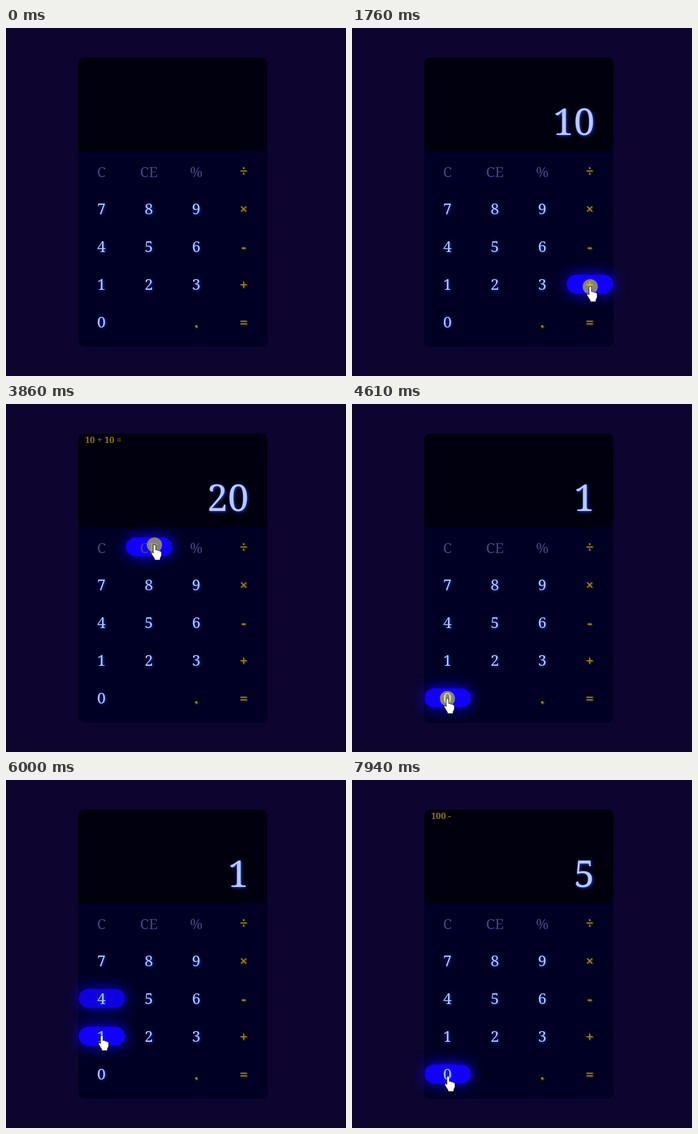
Write an HTML page that moves like this. It is 538 by 553 pixels and loops after 8000 ms.

```html
<!DOCTYPE html>
<html lang="pt">
<head>
<meta charset="utf-8">
<title>Calculadora</title>
<style>
  html, body { margin: 0; width: 100%; height: 100%; overflow: hidden; background: #0d0530; }
  svg { display: block; width: 538px; height: 553px; }
  text { font-family: "Noto Serif", serif; }
  .key { font-size: 24px; text-anchor: middle; }
  .digit, #display { fill: #bcc8ff; filter: drop-shadow(1px 1px 2px #1450e0); }
  .tool { font-size: 22.5px; fill: #4a4284; }
  .op { fill: #a08013; font-weight: 700; filter: drop-shadow(1px 1px 1px #6b5205); }
  .pill { fill: #1100ff; filter: drop-shadow(0 0 11px #1100ff); }
  #display { font-size: 59px; text-anchor: end; }
  #history { font-size: 14px; font-weight: 700; fill: #8f7412; }
  #menu text { font: 10.5px "Open Sans", sans-serif; fill: #fff; }
  #cursor path { fill: #fff; stroke: #000; stroke-width: .8; stroke-linejoin: round; }
</style>
</head>
<body>
<svg viewBox="0 0 538 553">
  <rect x="114" y="47" width="300" height="460" rx="10" fill="#000024"/>
  <rect x="114" y="47" width="300" height="150" rx="10" fill="#00000f"/>
  <text id="history" x="125" y="62"></text>
  <text id="display" x="384" y="170"></text>
  <g id="pills"></g>
  <g id="keys"></g>
  <g id="selection">
    <rect x="144" y="452" width="14" height="30" fill="#0860da"/>
    <text class="key" x="151" y="476" fill="#fff">0</text>
  </g>
  <g id="menu">
    <path d="M143 436H159L151 447Z" fill="#26222f"/>
    <rect x="87" y="406" width="127" height="31" rx="4" fill="#26222f"/>
    <path d="M157.5 414V430" stroke="#565161"/>
    <text x="99" y="425">Pesquisar</text>
    <text x="170" y="425">Copiar</text>
  </g>
  <circle id="press" r="12" fill="#ff0" fill-opacity=".5"/>
  <g id="cursor">
    <path id="arrow" d="M0 0V16L3.7 12.5 6.2 18.5 8.8 17.4 6.3 11.6H11.5Z"/>
    <path id="hand" d="M-2 1.5a2 2 0 0 1 4 0V8q2.5-1 3.5 1 2-1 3 1 2.500-1 2.500 2v5l-2 4v3H0v-2L-5 14q-1-3 2-3l1 2z"/>
  </g>
</svg>
<script>
const LOOP = 8000;
const $ = id => document.getElementById(id);

// Cursor stops: time, x, y
const path = [
  [70, 57, 493], [500, 145, 462], [760, 157, 406], [940, 157, 406],
  [1120, 152, 468], [1270, 152, 468], [1600, 377, 411], [1820, 377, 411],
  [2050, 155, 410], [2200, 155, 410], [2340, 152, 468], [2450, 152, 468],
  [2520, 215, 452], [2740, 376, 470], [2930, 376, 470], [3130, 428, 450],
  [3400, 330, 375], [3700, 235, 224], [3930, 235, 224], [4210, 152, 410],
  [4370, 152, 410], [4560, 151, 468], [5050, 151, 467], [5170, 146, 263],
  [5300, 143, 254], [5420, 150, 229], [5740, 150, 229], [6130, 152, 467],
  [6560, 152, 467], [6640, 255, 388], [6760, 313, 382], [6950, 377, 349],
  [7110, 377, 349], [7340, 227, 352], [7570, 227, 352], [7900, 152, 471],
  [8000, 152, 471]
];
const presses = [870, 1180, 1740, 2140, 2400, 2820, 3850, 4300, 4650, 4880, 5480, 5660, 6250, 6400, 7030, 7460];
const displaySteps = [
  [0, ""], [935, "1"], [1240, "10"], [2200, "1"], [2460, "10"], [2880, "20"],
  [3925, ""], [4360, "1"], [4710, "10"], [4940, "100"], [5540, "10"],
  [5720, "1"], [6310, "10"], [6460, "100"], [7530, "5"]
];
const historySteps = [[0, ""], [1790, "10 +"], [2880, "10 + 10 ="], [3925, ""], [7090, "100 -"]];
const selections = [[4950, 5450], [6460, 7000]];
const menus = [[5090, 5450], [6520, 7000]];

const rows = [["C", "CE", "%", "÷"], ["7", "8", "9", "×"], ["4", "5", "6", "-"],
              ["1", "2", "3", "+"], ["0", "", ".", "="]];

function add(parent, tag, attrs) {
  const el = document.createElementNS("http://www.w3.org/2000/svg", tag);
  for (const name in attrs) el.setAttribute(name, attrs[name]);
  return parent.appendChild(el);
}

const keys = rows.flatMap((row, r) => row.map((label, c) => {
  if (!label) return null;
  const x = 115 + 75 * c, y = 212 + 60 * r;
  const kind = /\d/.test(label) ? "digit" : /[CE%]/.test(label) ? "tool" : "op";
  const pill = add($("pills"), "rect", { class: "pill", x, y, width: 73, height: 30, rx: 15 });
  const text = add($("keys"), "text", { class: "key " + kind, x: x + 36, y: y + (kind == "tool" ? 25 : 24) });
  text.textContent = label;
  return { x, y, pill };
})).filter(Boolean);

const clamp = v => Math.max(0, Math.min(1, v));
const latest = (steps, t) => steps.findLast(s => s[0] <= t)[1];
const during = (spans, t) => spans.find(([from, to]) => t >= from && t < to);
const inside = (key, [x, y]) => x >= key.x && x <= key.x + 73 && y >= key.y && y <= key.y + 30;
const show = (el, on) => el.style.opacity = Number(on);

function position(t) {
  const i = path.findIndex(p => p[0] > t);
  if (i === 0) return [-99, -99];
  const [t0, x0, y0] = path[i - 1], [t1, x1, y1] = path[i];
  const s = (t - t0) / (t1 - t0), k = s * s * (3 - 2 * s);
  return [x0 + (x1 - x0) * k, y0 + (y1 - y0) * k];
}

function draw(t) {
  // Recent positions let a key stay lit briefly after the cursor leaves it.
  const trail = Array.from({ length: 13 }, (_, i) => position(t - i * 10));
  const [x, y] = trail[0];
  for (const key of keys) {
    const age = trail.findIndex(p => inside(key, p)) * 10;
    show(key.pill, age < 0 ? 0 : clamp((120 - age) / 70));
  }
  const hovering = keys.some(key => inside(key, trail[0]));
  show($("hand"), hovering);
  show($("arrow"), !hovering);
  $("cursor").setAttribute("transform", `translate(${x} ${y})`);
  $("press").setAttribute("cx", x);
  $("press").setAttribute("cy", y);
  show($("press"), presses.some(p => Math.abs(t - p) < 65));

  $("display").textContent = latest(displaySteps, t);
  $("history").textContent = latest(historySteps, t);
  show($("selection"), !!during(selections, t));
  const menu = during(menus, t);
  show($("menu"), menu ? clamp((t - menu[0]) / 200) : 0);
}

const start = performance.now();
function frame() {
  draw((performance.now() - start) % LOOP);
  requestAnimationFrame(frame);
}
draw(0);
requestAnimationFrame(frame);
</script>
</body>
</html>
```
